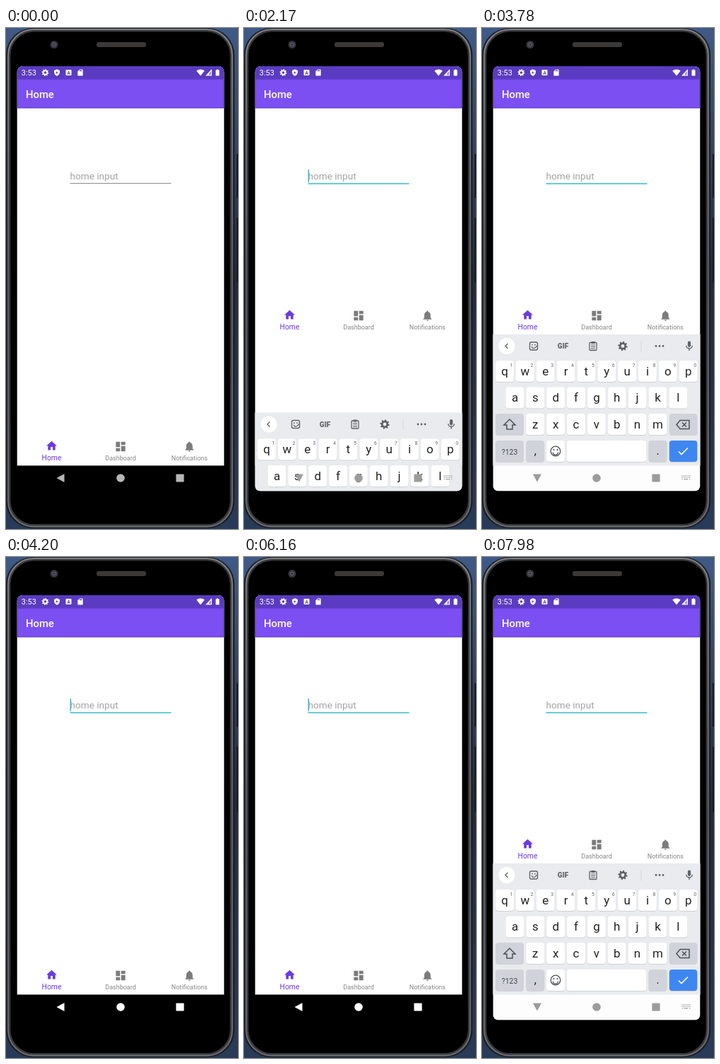
An HTML page with a canvas for the animation above (8 s loop, 328 by 708 pixels).

```html
<!DOCTYPE html>
<html lang="en">
<head>
<meta charset="utf-8">
<title>Phone input</title>
<style>
  html, body { margin: 0; width: 100%; height: 100%; overflow: hidden; background: #22375a; }
  canvas { display: block; width: 328px; height: 708px; }
</style>
</head>
<body>
<canvas id="stage"></canvas>
<script>
const W = 328, H = 708, LOOP = 8000, STEP = 70;
const FOCUS = 2060, SLIDE = 200, KEYBOARD_TOP = 433, KEYBOARD_H = 221;
const SHOWS = [2130, 6650], HIDE = 3850;

const canvas = document.getElementById('stage');
const ctx = canvas.getContext('2d');
const scale = window.devicePixelRatio || 1;
canvas.width = W * scale;
canvas.height = H * scale;

const icons = {
  home: 'M10 20v-6h4v6h5v-8h3L12 3 2 12h3v8z',
  dashboard: 'M3 13h8V3H3zm0 8h8v-6H3zm10 0h8V11h-8zm0-18v6h8V3z',
  bell: 'M12 22c1.1 0 2-.9 2-2h-4c0 1.1.9 2 2 2zm6-6v-5c0-3.07-1.64-5.64-4.5-6.32V4c0-.83-.67-1.5-1.5-1.5s-1.5.67-1.5 1.5v.68C7.63 5.36 6 7.92 6 11v5l-2 2v1h16v-1z',
  mic: 'M12 14c1.66 0 3-1.34 3-3V5a3 3 0 0 0-6 0v6c0 1.66 1.34 3 3 3zm5-3a5 5 0 0 1-10 0H5c0 3.53 2.61 6.43 6 6.92V21h2v-3.08c3.39-.49 6-3.39 6-6.92z',
  shield: 'M12 1L3 5v6c0 5.55 3.84 10.74 9 12 5.16-1.26 9-6.45 9-12V5zM9 8l7 4-7 4z',
  sdCard: 'M18 2h-8L4 8v12a2 2 0 0 0 2 2h12a2 2 0 0 0 2-2V4a2 2 0 0 0-2-2zM9 8h2V4H9zm3 0h2V4h-2zm3 0h2V4h-2z',
  wifi: 'M12 21.5L24 7C18 1 6 1 0 7z',
  battery: 'M16 4h-2V2h-4v2H8a1.5 1.5 0 0 0-1.5 1.5v15A1.5 1.5 0 0 0 8 22h8a1.5 1.5 0 0 0 1.5-1.5v-15A1.5 1.5 0 0 0 16 4z'
};
for (const name in icons) icons[name] = new Path2D(icons[name]);

function bezier(x1, y1, x2, y2) {
  const at = (a, b, u) => 3 * (1 - u) * (1 - u) * u * a + 3 * (1 - u) * u * u * b + u ** 3;
  return p => {
    let lo = 0, hi = 1;
    for (let i = 0; i < 24; i++) {
      const mid = (lo + hi) / 2;
      if (at(x1, x2, mid) < p) lo = mid; else hi = mid;
    }
    return at(y1, y2, lo);
  };
}
const easeShow = bezier(0, 0, .2, 1);
const easeHide = bezier(.4, 0, 1, 1);
const clamp = v => Math.max(0, Math.min(1, v));

function verticalGradient(...colors) {
  const gradient = ctx.createLinearGradient(0, 0, 0, H);
  colors.forEach((color, i) => gradient.addColorStop(i / (colors.length - 1), color));
  return gradient;
}
function rect(x, y, w, h, color) {
  ctx.fillStyle = color;
  ctx.fillRect(x, y, w, h);
}
function roundPath(x, y, w, h, r) {
  ctx.beginPath();
  ctx.roundRect(x, y, w, h, r);
}
function round(x, y, w, h, r, color) {
  roundPath(x, y, w, h, r);
  ctx.fillStyle = color;
  ctx.fill();
}
function frame(x, y, w, h, r, color, width) {
  roundPath(x, y, w, h, r);
  ctx.strokeStyle = color;
  ctx.lineWidth = width;
  ctx.stroke();
}
function circle(x, y, r, color) {
  ctx.beginPath();
  ctx.arc(x, y, r, 0, Math.PI * 2);
  ctx.fillStyle = color;
  ctx.fill();
}
function trace(points) {
  ctx.beginPath();
  points.forEach(([x, y]) => ctx.lineTo(x, y));
}
function polygon(points, color) {
  trace(points);
  ctx.fillStyle = color;
  ctx.fill();
}
function line(points, color, width) {
  trace(points);
  ctx.strokeStyle = color;
  ctx.lineWidth = width;
  ctx.stroke();
}
function text(str, x, y, size, color, align = 'left', weight = 400) {
  ctx.font = `${weight} ${size}px Roboto, sans-serif`;
  ctx.textAlign = align;
  ctx.fillStyle = color;
  ctx.fillText(str, x, y);
}
function icon(name, x, y, size, color) {
  ctx.save();
  ctx.translate(x - size / 2, y - size / 2);
  ctx.scale(size / 24, size / 24);
  ctx.fillStyle = color;
  ctx.fill(icons[name], 'evenodd');
  ctx.restore();
}
function gear(x, y, r, color) {
  ctx.beginPath();
  for (let i = 0; i < 32; i++) {
    const a = (i + .5) * Math.PI / 16;
    const d = i % 4 < 2 ? r : r * .74;
    ctx.lineTo(x + d * Math.cos(a), y + d * Math.sin(a));
  }
  ctx.closePath();
  ctx.arc(x, y, r * .36, 0, Math.PI * 2, true);
  ctx.fillStyle = color;
  ctx.fill('evenodd');
}

function drawPhone() {
  rect(0, 0, W, H, verticalGradient('#3f5a86', '#1f2a3e', '#283b58'));
  round(326, 178, 4, 62, 1, '#15171c');
  round(326, 268, 4, 92, 1, '#15171c');
  round(0, 0, 323, 707, 38, '#17181b');
  frame(4, 3, 315, 700.5, 35, '#38393c', 5);
  frame(3.2, 2.2, 316.6, 702.3, 36, verticalGradient('#85868a', '#5c5d61', '#6c6e73'), 1.8);
  round(6.5, 5.5, 310, 695.5, 33, '#000');
  circle(68, 23.5, 5.5, '#35353b');
  circle(68, 23.5, 3, '#555765');
  circle(68, 23.5, 1.5, '#30323c');
  round(128, 20, 70, 7, 3, '#3b3836');
}

function drawStatusBar() {
  rect(15, 54, 294, 18, '#5b3bc1');
  text('3:53', 21.8, 67, 10.9, '#fff');
  gear(55.5, 63, 5, '#fff');
  icon('shield', 72, 63, 10.5, '#fff');
  round(84.5, 59, 8, 8, 1, '#fff');
  text('A', 88.5, 65.6, 7, '#5b3bc1', 'center', 700);
  icon('sdCard', 105, 63, 11, '#fff');
  icon('wifi', 275, 63, 11.5, '#fff');
  polygon([[282, 67.5], [291, 67.5], [291, 58]], '#fff');
  polygon([[287, 66.5], [290, 66.5], [290, 61], [287, 64]], '#a58fe0');
  icon('battery', 299, 63, 11, '#fff');
}

function drawApp(t, resized) {
  rect(15, 54, 294, 564.4, '#fff');
  drawStatusBar();
  rect(15, 72, 294, 41.4, '#7c4ff3');
  frame(16.3, 72.6, 291.4, 40.2, 0, 'rgba(70, 40, 165, .4)', 1.4);
  text('Home', 28, 98.7, 14.8, '#fff', 'left', 500);

  text('home input', 90.5, 214, 13.6, '#a3a3a3');
  if (t < FOCUS) {
    rect(90.5, 219, 143, 1, '#8b8b8b');
  } else {
    rect(90.5, 219, 143, 2, '#66ced6');
    if ((t - FOCUS) % 1000 < 500) rect(90.6, 200, 1.4, 18, '#46a9b0');
  }

  ctx.save();
  if (resized) ctx.translate(0, -185);
  icon('home', 64.5, 590.5, 17.8, '#6a3cdc');
  text('Home', 64.5, 611, 10.4, '#6a3cdc', 'center');
  icon('dashboard', 162, 591.5, 17.8, '#7c7c7c');
  text('Dashboard', 162, 611, 9, '#858585', 'center');
  icon('bell', 259.3, 591.5, 17.8, '#7c7c7c');
  text('Notifications', 259.3, 611, 9, '#858585', 'center');
  ctx.restore();
}

function key(x, y, w, color = '#fff') {
  round(x, y + 1, w, 30, 4, '#cfd1d6');
  round(x, y, w, 30, 4, color);
}
function letterRow(letters, x, y, numbered) {
  [...letters].forEach((letter, i) => {
    const cx = x + i * 28.85;
    key(cx - 12.9, y, 25.8);
    text(letter, cx, y + 20.5, 17, '#222', 'center');
    if (numbered) text((i + 1) % 10, cx + 9.5, y + 8.5, 7, '#666', 'center');
  });
}

function drawToolbar() {
  const ink = '#5f6368', y = 449.5;
  circle(35, y, 11.5, '#fff');
  line([[36.5, y - 3.5], [33, y], [36.5, y + 3.5]], ink, 1.4);

  frame(67.5, y - 5.5, 11, 11, 2, ink, 1.4);
  circle(71, y - 1.8, .9, ink);
  circle(75, y - 1.8, .9, ink);
  line([[70, y + 1], [72, y + 3], [75, y + 2.5], [78, y - .5]], ink, 1.2);

  text('GIF', 114.5, y + 3.5, 10, ink, 'center', 900);

  frame(152, y - 5, 10, 11, 1, ink, 1.3);
  rect(154.5, y - 6.5, 5, 3, ink);
  for (let i = 0; i < 3; i++) rect(154, y - 2 + i * 2.5, 6, 1, ink);

  gear(199, y, 6.8, ink);
  rect(224.5, y - 7, 1, 15, '#d5d7db');
  for (let i = -1; i < 2; i++) circle(251 + i * 5, y, 1.4, ink);
  icon('mic', 293, y, 17, ink);
}

function drawKeyboard() {
  const gray = '#d0d3d9', ink = '#4d5156';
  rect(15, KEYBOARD_TOP, 294, KEYBOARD_H + 1, '#fdfdfd');
  rect(15, KEYBOARD_TOP, 294, 185.5, '#e9ebef');
  drawToolbar();

  letterRow('qwertyuiop', 32, 470, true);
  letterRow('asdfghjkl', 46.5, 507.5);
  letterRow('zxcvbnm', 75.3, 545);

  key(19, 545, 40, gray);
  trace([[39, 553], [47, 561], [43, 561], [43, 567], [35, 567], [35, 561], [31, 561]]);
  ctx.closePath();
  ctx.strokeStyle = ink;
  ctx.lineWidth = 1.5;
  ctx.stroke();

  key(264.8, 545, 39.5, gray);
  trace([[275, 560.5], [280, 554.5], [293, 554.5], [293, 566.5], [280, 566.5]]);
  ctx.closePath();
  ctx.stroke();
  line([[283, 557.5], [289, 563.5]], ink, 1.4);
  line([[289, 557.5], [283, 563.5]], ink, 1.4);

  key(19, 583, 40, gray);
  text('?123', 39, 602.5, 10.5, '#44474c', 'center');
  key(62.4, 583, 25.8, gray);
  text(',', 75.3, 603, 16, '#222', 'center');
  key(91.2, 583, 25.8);
  ctx.beginPath();
  ctx.arc(104, 598, 6.8, 0, Math.PI * 2);
  ctx.moveTo(107.6, 599.5);
  ctx.arc(104, 599.5, 3.6, 0, Math.PI);
  ctx.strokeStyle = ink;
  ctx.lineWidth = 1.3;
  ctx.stroke();
  circle(101.5, 596, 1.1, ink);
  circle(106.5, 596, 1.1, ink);
  key(119.8, 583, 112.5);
  key(235.6, 583, 25.8, gray);
  text('.', 248.5, 603, 16, '#222', 'center');
  key(264.8, 583, 39.5, '#3f87f0');
  line([[278, 598.5], [282, 602.5], [291, 593.5]], '#fff', 1.6);
}

function drawSystemNav(open, color) {
  const back = open
    ? [[72, 630.5], [84, 630.5], [78, 641.5]]
    : [[82.5, 630], [82.5, 642], [71.5, 636]];
  polygon(back, color);
  circle(162, 636, 5.8, color);
  round(240.4, 630.4, 11.2, 11.2, .8, color);
  if (!open) return;
  for (let row = 0; row < 3; row++)
    for (let col = 0; col < 6; col++)
      if (row < 2 || col === 0 || col === 5)
        rect(282.5 + col * 2.1, 632 + row * 2.5, 1.3, 1.4, '#a8a8a8');
  rect(285.5, 637, 5.5, 1.4, '#a8a8a8');
}

function keyboardOffset(t) {
  if (t < SHOWS[0] || (t >= HIDE + SLIDE && t < SHOWS[1])) return KEYBOARD_H;
  if (t >= HIDE && t < SHOWS[1]) return KEYBOARD_H * easeHide((t - HIDE) / SLIDE);
  const start = t < HIDE ? SHOWS[0] : SHOWS[1];
  return KEYBOARD_H * (1 - easeShow(clamp((t - start) / SLIDE)));
}

function draw(t) {
  ctx.setTransform(scale, 0, 0, scale, 0, 0);
  drawPhone();
  ctx.save();
  roundPath(15.7, 54, 292.6, 600.2, [8, 8, 7, 7]);
  ctx.clip();
  rect(15, 54, 294, 601, '#000');
  const open = (t >= SHOWS[0] && t < HIDE) || t >= SHOWS[1];
  drawApp(t, open);
  const offset = keyboardOffset(t);
  if (offset < KEYBOARD_H) {
    ctx.save();
    ctx.translate(0, offset);
    drawKeyboard();
    ctx.restore();
  }
  drawSystemNav(open, open ? '#9c9c9c' : t < SHOWS[0] ? '#b6b6b6' : '#fff');
  ctx.restore();
}

// The screen refreshes in fixed steps, like a screen recording.
function tick() {
  const t = performance.now() % LOOP;
  draw(Math.floor(t / STEP) * STEP);
  requestAnimationFrame(tick);
}
tick();
</script>
</body>
</html>
```
